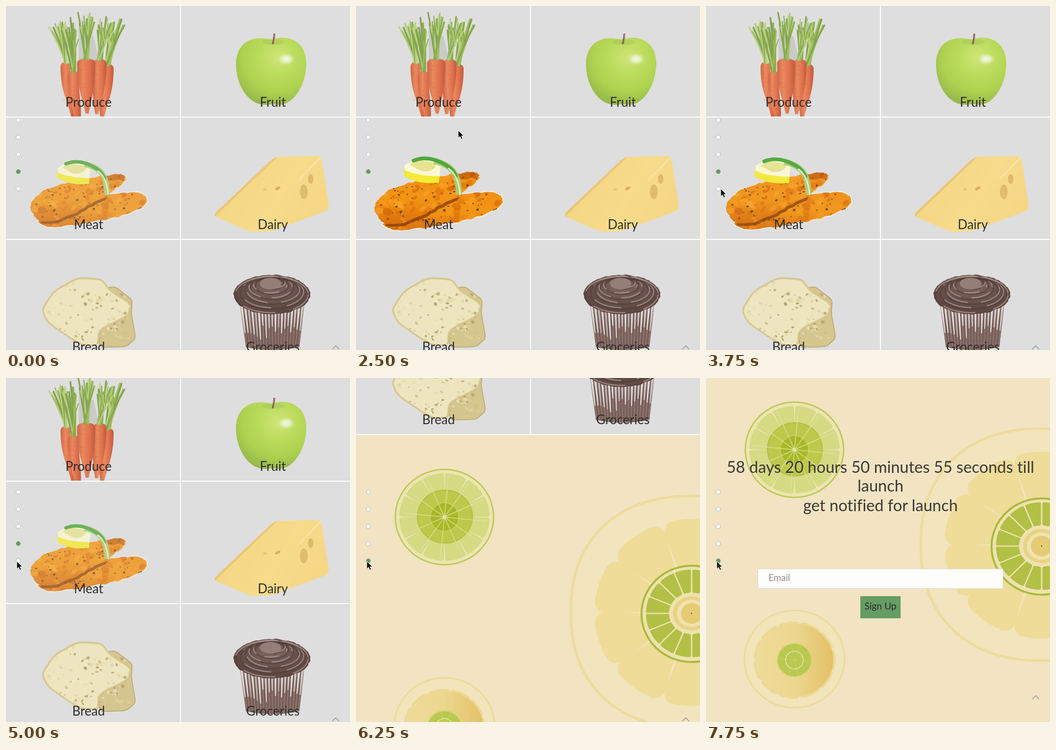
Recreate the animation shown at these times as an HTML page. Size 700 px wide and 700 px high, loop 8000 ms.

```html
<!DOCTYPE html>
<html lang="en">
<head>
<meta charset="utf-8">
<title>Food departments</title>
<style>
html, body { margin: 0; height: 100%; overflow: hidden; background: #dedede; }
svg { display: block; width: 100vw; height: 100vh; }
text { font-family: Lato, "Open Sans", sans-serif; font-variant-ligatures: none; text-anchor: middle; fill: #2e2e2e; }
.label { font-size: 26px; }
.big { font-size: 32.5px; fill: #3a3835; }
.hint { font-size: 18.7px; fill: #918c86; text-anchor: start; }
.button { font-size: 19.2px; }
.photo { opacity: .8; }
</style>
</head>
<body>
<svg viewBox="0 0 700 700">
  <defs id="defs"></defs>
  <g id="page"></g>
  <g id="dots" stroke="#b0b0b0"></g>
  <path id="top" d="M664 698.5L671 691.5L678 698.5" fill="none" stroke="#aaa8a4" stroke-width="2"/>
  <path id="cursor" d="M0 0V15.5L3.7 12.2L6.3 18L9 16.8L6.5 11.2H11.3Z" fill="#000" stroke="#fff"/>
</svg>
<script>
const $ = id => document.getElementById(id);
let seed = 7;
const rnd = (a = 0, b = 1) => {
  seed = (seed * 16807) % 2147483647;
  return a + (b - a) * seed / 2147483647;
};
const pick = list => list[Math.floor(rnd(0, list.length))];
const list = (n, fn) => Array.from({ length: n }, (_, i) => fn(i));
const times = (n, fn) => list(n, fn).join('');
const clamp = v => Math.max(0, Math.min(1, v));
const lerp = (a, b, k) => a + (b - a) * k;
const swing = v => .5 - .5 * Math.cos(Math.PI * clamp(v));
const xy = (x, y) => x.toFixed(1) + ' ' + y.toFixed(1);

const path = (d, fill, more = '') => `<path d="${d}" fill="${fill}" ${more}/>`;
const line = (d, color, w, more = '') => path(d, 'none', `stroke="${color}" stroke-width="${w}" stroke-linecap="round" ${more}`);
const oval = (x, y, rx, ry, fill, more = '') => `<ellipse cx="${x}" cy="${y}" rx="${rx}" ry="${ry}" fill="${fill}" ${more}/>`;
const ring = (x, y, rx, ry, color, w, more = '') => oval(x, y, rx, ry, 'none', `stroke="${color}" stroke-width="${w}" ${more}`);
const rect = (x, y, w, h, fill, more = '') => `<rect x="${x}" y="${y}" width="${w}" height="${h}" fill="${fill}" ${more}/>`;
const text = (x, y, s, cls) => `<text class="${cls}" x="${x}" y="${y}">${s}</text>`;

// Superellipse outline with optional roughness, taper and tilt
function round(x, y, rx, ry, { rough = 0, square = 2, taper = 0, tilt = 0 } = {}) {
  return 'M' + list(72, i => {
    const a = i * Math.PI / 36, c = Math.cos(a), s = Math.sin(a);
    const r = (Math.abs(c) ** square + Math.abs(s) ** square) ** (-1 / square);
    const u = r * c * rx + rnd(-rough, rough), v = r * s * ry * (1 + taper * r * c) + rnd(-rough, rough);
    return xy(x + u * Math.cos(tilt) - v * Math.sin(tilt), y + u * Math.sin(tilt) + v * Math.cos(tilt));
  }).join('L') + 'Z';
}
// Polygon with softened corners
function soft(pts, k) {
  const n = pts.length, toward = (p, q) => xy(lerp(p[0], q[0], k), lerp(p[1], q[1], k));
  return 'M' + pts.map((p, i) =>
    `${toward(p, pts[(i + n - 1) % n])}Q${xy(...p)} ${toward(p, pts[(i + 1) % n])}`).join('L') + 'Z';
}
function grad(id, kind, attrs, ...colors) {
  $('defs').innerHTML += `<${kind}Gradient id="${id}" ${attrs}>` +
    colors.map((c, i) => `<stop offset="${i / (colors.length - 1)}" stop-color="${c}"/>`).join('') + `</${kind}Gradient>`;
  return `url(#${id})`;
}
function clipped(id, d, fill, inner, more = '') {
  $('defs').innerHTML += `<clipPath id="${id}"><path d="${d}"/></clipPath>`;
  return path(d, fill, more) + `<g clip-path="url(#${id})">${inner}</g>`;
}
const specks = (n, [x0, x1, y0, y1], size, colors, alpha) => times(n, () => {
  const r = rnd(size * .4, size);
  return path(round(rnd(x0, x1), rnd(y0, y1), r, r * rnd(.4, .9), { tilt: rnd(-1, 1) }), pick(colors), `opacity="${alpha}"`);
});

function carrots() {
  const skin = grad('skin', 'linear', '', '#c94a1e', '#ee7441', '#e2592c', '#b83c16');
  const body = (x, top, w) => {
    const l = x - w / 2, r = x + w / 2, tx = lerp(x, 170, .3), ty = top + 112;
    return path(`M${l} ${top + 10}Q${l} ${top} ${x} ${top}Q${r} ${top} ${r} ${top + 10}` +
      `C${r} ${top + 60} ${tx + 10} ${ty - 34} ${tx + 3} ${ty}H${tx - 3}C${tx - 10} ${ty - 34} ${l} ${top + 60} ${l} ${top + 10}Z`, skin) +
      times(8, i => line(`M${xy(x - w * rnd(-.1, .35), top + 14 + i * 9)}h${w * .2}`, '#b8431b', .8, 'opacity=".5"'));
  };
  const stalks = (x, y) => times(12, i => {
    const lean = (x - 163) * .4, bx = x + rnd(-5, 5);
    const tx = x + lean + (i - 5.5) * 3, ty = 13 + Math.abs(x - 163) * .3 + rnd(0, 32);
    const mx = lerp(bx, tx, .45), my = lerp(y, ty, .5), color = pick(['#8fb83a', '#76a227', '#b4cf70', '#6d9530']);
    return line(`M${xy(bx, y + 2)}Q${xy(mx - lean * .1, my)} ${xy(tx, ty)}`, color, rnd(2, 4).toFixed(1)) +
      line(`M${xy(mx, my)}l${xy(rnd(-9, 9), -rnd(20, 36))}`, color, 1.8);
  });
  const roots = [[121, 114, 20], [207, 118, 24], [191, 108, 27], [137, 132, 22], [163, 107, 37]];
  return path('M148 45L178 62L190 112H148Z', '#c6c7c2') + roots.map(([x, y, w]) => body(x, y, w) + stalks(x, y)).join('');
}

function apple() {
  const skin = grad('apple', 'radial', 'cx=".6" cy=".3" r=".75"', '#cfe75f', '#b4dc3f', '#a2d02c', '#82ac25');
  const glow = grad('glow', 'radial', '', '#fbfdf3', '#e3f3b2', '#c9ea6800');
  return path('M542 69C560 59 609 62 611 114C612 158 586 201 556 201Q543 199 530 201' +
    'C493 203 468 160 468 119C468 72 504 58 542 69Z', skin) +
    oval(544, 73, 23, 6, '#93bd38', 'opacity=".45"') + oval(570, 108, 19, 13, glow) +
    line('M543 76Q546 66 546 58', '#7c4631', 4) + line('M546 72Q548 65 547 59', '#c99b75', 1.5);
}

function meat() {
  const crust = grad('crust', 'linear', 'x2="0" y2="1"', '#f08e14', '#f39514', '#d9700b');
  const marks = area => specks(90, area, 9, ['#ffab2a', '#dc6c08', '#f9a01f', '#c95c08'], .5) +
    specks(80, area, 2.6, ['#5e2d08', '#8a3d08', '#46330e'], .75);
  const rim = 'stroke="#f4efea" stroke-width="2"';
  const low = round(176, 416, 113, 24, { rough: 1.6, square: 2.5, taper: .15, tilt: -.21 });
  const high = round(148, 384, 101, 29, { rough: 1.6, square: 2.5, taper: -.45, tilt: -.36 });
  return '<g id="meat">' + clipped('low', low, crust, marks([65, 287, 370, 458]), rim) +
    path(high, '#7c3506', 'transform="translate(3 5)" opacity=".7" clip-path="url(#low)"') +
    clipped('high', high, crust, marks([52, 245, 330, 438]) + oval(215, 343, 20, 13, '#a84406', 'opacity=".5"')) +
    path('M105 331L127 316L172 325L169 362Q128 366 104 349Z', '#f5ea35') +
    path('M105 330L127 316L172 325L170 350Q130 350 106 339Z', '#fbf8d4') +
    path('M115 329L129 320L165 326Q160 343 137 341Z', '#e6e491') +
    line('M160 322C202 330 205 358 206 384', '#aacb72', 11, 'style="stroke-linecap:butt"') +
    line('M122 321C145 312 167 320 183 330Q196 338 200 350', '#4fa83c', 7) +
    line('M208 384C206 360 199 345 187 336', '#e3ebb5', 3) + '</g>';
}

function cheese() {
  const face = grad('cheese', 'linear', 'y2=".4"', '#edbe58', '#fbd770', '#ffdc78', '#fbd670');
  const body = soft([[421, 426], [546, 307], [638, 305], [643, 316], [658, 415], [540, 458], [500, 460], [470, 448]], .1);
  return clipped('wedge', body, face, line('M421 426L546 307', '#d69f3c', 9, 'opacity=".4"') + line('M639 309L598 352', '#ffe597', 3)) +
    oval(606, 378, 8, 15, '#e0b552') + oval(620, 352, 5.5, 10, '#e0b24d') +
    oval(553, 371, 6, 3, '#daa440', 'transform="rotate(-30 553 371)"') + oval(527, 373, 4, 2.5, '#ebc15f');
}

function bread() {
  const back = soft([[195, 575], [222, 571], [257, 598], [255, 625], [264, 676], [245, 693], [188, 695]], .2);
  const front = soft([[72, 618], [96, 580], [145, 552], [195, 555], [212, 578], [256, 606], [250, 630], [190, 660], [188, 692], [150, 690], [84, 645]], .28);
  const crumb = () => specks(90, [75, 262, 555, 695], 5, ['#e6d79b', '#f9f1cd', '#d9c988'], .55) +
    specks(40, [95, 245, 575, 680], 4, ['#a8924e', '#9a8136', '#c4b06a'], .75);
  return clipped('back', back, '#d3c07c', crumb(), 'stroke="#b1954a" stroke-width="1.5"') +
    clipped('front', front, '#f1e7b8', crumb() + line(front, '#d8c47d', 6), 'stroke="#c2aa5a"');
}

function cupcake() {
  const pleats = times(19, i => {
    const k = (i + .5) / 19, x = lerp(476, 607, k), end = lerp(488, 597, k), deep = rnd(.45, .8);
    return path(`M${xy(x - 2.6, 608)}h5.2L${xy(lerp(x, end, deep) + 1, lerp(608, 700, deep))}h-2Z`, pick(['#c9bfbd', '#b3a39f', '#dcd6d4'])) +
      line(`M${xy(x + 3.4, 612)}L${xy(end + 2.8, 702)}`, '#452820', 1.4);
  });
  // Each turn of icing is a shadow band with a broken highlight above it
  const swirls = times(6, i => {
    const rx = 24 + i * 10, ry = 12 + i * 5, y = 565 + i * 5;
    return ring(541, y, rx, ry, '#2f160f', 3, 'opacity=".6"') +
      ring(541 + rnd(-4, 4), y - 3, rx, ry, '#a58b85', 2.5, `opacity=".7" stroke-dasharray="${rx * .9} ${rx * .5}" stroke-dashoffset="${i * 25}"`);
  });
  const cup = 'M476 606L488 694Q540 706 597 694L607 606Z';
  return clipped('cup', cup, '#75544c', pleats) +
    clipped('ice', round(541, 587, 78, 40, { rough: 1 }), grad('choc', 'radial', 'cy=".35"', '#6a4a43', '#54362f', '#41241d'),
      swirls + oval(538, 565, 22, 12, '#83665f'));
}

// Ring of rounded citrus segments
const wedges = (x, y, r0, rx, ry, n, fill, gap, bend) => times(n, i => {
  const step = Math.PI * 2 / n, a0 = Math.PI + i * step, inset = (gap + bend) / 2;
  const low = (r0 + bend / 2) / rx, far = 1 - bend / 2 / rx, da = inset / rx, db = Math.min(da / low, step * .45);
  const at = (k, a) => xy(x + rx * k * Math.cos(a), y + ry * k * Math.sin(a));
  const rim = list(7, j => at(far, a0 + lerp(da, step - da, j / 6)));
  return path('M' + [at(low, a0 + db), ...rim, at(low, a0 + step - db)].join('L') + 'Z', fill,
    `stroke="${fill}" stroke-width="${bend}" stroke-linejoin="round"`);
});
const spokes = (x, y, r, n, color, w) => times(n, i => {
  const a = i * Math.PI * 2 / n + .1;
  return line(`M${x} ${y}l${xy(r * Math.cos(a), r * Math.sin(a))}`, color, w, 'opacity=".7"');
});

function citrus() {
  const warm = grad('warm', 'linear', '', '#eedd9c', '#ecd68c', '#dfb655');
  const lime = oval(180, 892, 100, 97, '#eee4b2', 'stroke="#bdcb58" stroke-width="3"') +
    wedges(180, 892, 8, 92, 89, 12, '#d5da83', 3, 8) +
    oval(181, 891, 56, 54, '#bac844', 'stroke="#aebd3c" stroke-width="2" opacity=".9"') +
    oval(180, 892, 29, 29, '#a6b925', 'stroke="#c9d36e" stroke-width="1.5"') +
    spokes(180, 892, 86, 12, '#e0e2a0', 2) + oval(180, 892, 4, 4, '#e7e3a6');
  const lemon = oval(180, 1318, 102, 99, '#f2e4bb', 'stroke="#ecdb94" stroke-width="3"') +
    wedges(180, 1320, 4, 83, 78, 11, '#ecd892', 1, 14) + oval(180, 1320, 79, 74, warm, 'opacity=".7"') +
    oval(180, 1320, 35, 34, '#b9c84e', 'stroke="#d5d77f" stroke-width="2"') +
    spokes(180, 1320, 33, 10, '#cfd676', 1) + ring(180, 1320, 18, 18, '#dfe09a', 2);
  const core = ['#efe2b1', '#e8d384', '#f0e2b0', '#e5cc74'].map((c, i) => oval(683, 1088, 46 - i * 8, 42 - i * 7, c)).join('');
  const big = path(round(683, 1085, 246, 236, { square: 2.25 }), '#f2e4bd', 'stroke="#eddc9a" stroke-width="5"') +
    wedges(683, 1086, 90, 198, 189, 10, '#eedc98', 5, 44) +
    oval(683, 1089, 102, 98, '#eee2ae', 'stroke="#a9ba3d" stroke-width="4"') +
    wedges(683, 1088, 44, 93, 89, 16, '#b2c046', 3, 6) + core + oval(683, 1088, 1.2, 1.2, '#4a4030');
  return lime + lemon + big;
}

const form = () => '<g id="form" transform="translate(0 746)">' +
  text(355, 193, '58 days 20 hours 50 minutes 55 seconds till', 'big') +
  text(355, 231, 'launch', 'big') + text(355, 271, 'get notified for launch', 'big') +
  rect(105.5, 388.5, 499, 40, '#fdfdfc', 'stroke="#d8d6d2"') + text(127, 413, 'Email', 'hint') +
  rect(314, 444, 82, 45, '#659d64') + text(355, 471, 'Sign Up', 'button') + '</g>';

const cells = [['Produce', carrots], ['Fruit', apple], ['Meat', meat], ['Dairy', cheese], ['Bread', bread], ['Groceries', cupcake]];
const grid = cells.map(([name, photo], i) => {
  const x = i % 2 * 356, y = (i >> 1) * 249;
  return rect(x, y - 22, 354, 247, '#dedede') + `<g class="${photo === meat ? '' : 'photo'}">${photo()}</g>` +
    rect(x, y + 225, 354, 2, '#fff') + text(x ? 543 : 168, y + 205, name, 'label');
}).join('');
$('page').innerHTML = grid + rect(354, 0, 2, 724, '#fff') + rect(0, 725, 700, 730, '#f2e3c2') + citrus() + form();
$('dots').innerHTML = times(5, i => `<circle cx="25" cy="${232 + i * 35}" r="4.5"/>`);

const LOOP = 8000, STEP = 250, SCROLL = 746;
const stops = [[750, 12, 351], [1250, 21, 339], [1750, 21, 339], [2500, 208, 253], [3000, 208, 253], [3750, 30, 372], [4000, 22, 373]];

function pointer(t) {
  const i = stops.findLastIndex(s => s[0] <= t), a = stops[i], b = stops[i + 1] || a;
  if (!a) return null;
  const k = swing((t - a[0]) / (b[0] - a[0] || 1));
  return xy(lerp(a[1], b[1], k), lerp(a[2], b[2], k));
}

function draw(ms) {
  const t = Math.floor(ms % LOOP / STEP) * STEP;
  const y = SCROLL * swing((t - 4813) / 2000);
  const hover = swing((t - 2000) / 500) - swing((t - 3550) / 600);
  const show = swing((t - 6850) / 750);
  $('page').setAttribute('transform', `translate(0 ${-Math.round(y)})`);
  $('meat').setAttribute('transform', `translate(169 386) scale(${1 + .1 * hover}) translate(-169 -386)`);
  $('meat').setAttribute('opacity', .8 + .2 * hover);
  $('form').setAttribute('opacity', show);
  $('top').setAttribute('transform', `translate(0 ${-45 * show})`);
  const active = y > 400 ? 4 : 3;
  [...$('dots').children].forEach((dot, i) => dot.setAttribute('fill', i === active ? '#5f9a60' : '#fff'));
  const at = pointer(t);
  $('cursor').setAttribute('visibility', at ? 'visible' : 'hidden');
  $('cursor').setAttribute('transform', `translate(${at || '0 0'})`);
}
const start = performance.now();
const tick = () => {
  draw(performance.now() - start);
  requestAnimationFrame(tick);
};
tick();
</script>
</body>
</html>
```
